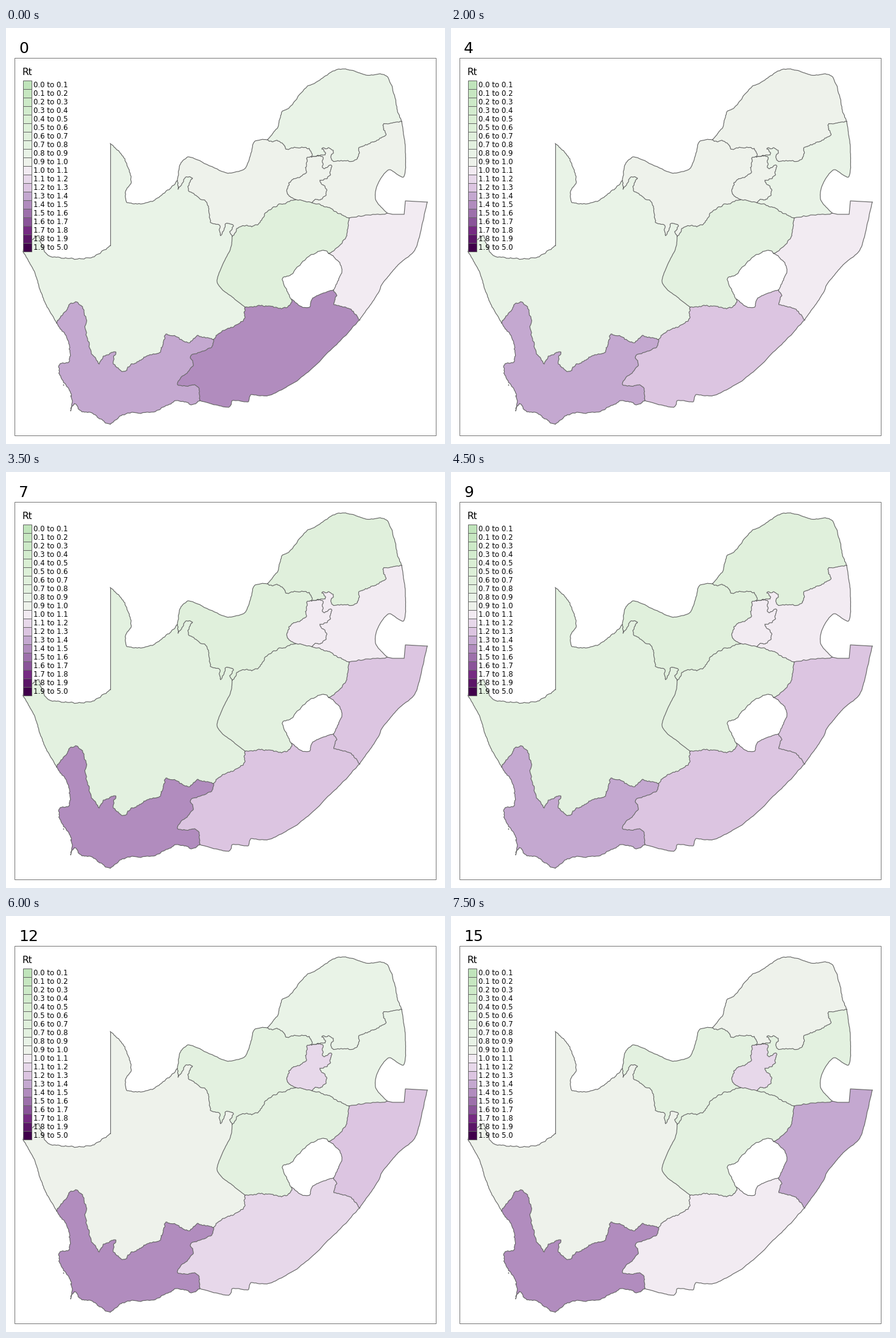
A matplotlib script that plays this animation: 720 px wide and 681 px high, repeating every 8000 ms.

```python
import numpy as np
import matplotlib.pyplot as plt
from matplotlib.animation import FuncAnimation
from matplotlib.colors import LinearSegmentedColormap
from matplotlib.patches import Polygon, Rectangle

W, H, DPI = 720, 681, 100
FRAMES, INTERVAL = 16, 500
CLASSES = 20
INK = "#666666"
rng = np.random.default_rng(7)

KEY_COLOURS = {0: "#c0e4bb", 4: "#daefd4", 7: "#e3f1e0", 8: "#e9f3e7", 9: "#eef2eb",
               10: "#f2ebf2", 12: "#dcc5e1", 13: "#c4a8d0", 16: "#8a5499",
               17: "#762b83", 19: "#40004b"}
palette = LinearSegmentedColormap.from_list(
    "rt", [(k / (CLASSES - 1), c) for k, c in KEY_COLOURS.items()], N=CLASSES)

borders = []


def px(size):
    return size * 72 / DPI


def arc(*keys, rough=0.1):
    """Curve through key points by four-point subdivision with fractal jitter."""
    pts = np.array(keys, float)
    for _ in range(4):
        pad = np.vstack([2 * pts[0] - pts[1], pts, 2 * pts[-1] - pts[-2]])
        step = np.diff(pts, axis=0)
        size = np.hypot(*step.T)[:, None]
        bulge = (pts[:-1] + pts[1:] - pad[:-3] - pad[3:]) / 16
        reach = np.hypot(*bulge.T)[:, None]
        bulge *= np.minimum(1, 0.1 * size / np.maximum(reach, 1e-9))
        normal = np.column_stack([-step[:, 1], step[:, 0]]) / size
        jag = rough * np.minimum(size, 6) * rng.uniform(-1, 1, size.shape)
        out = np.empty((2 * len(pts) - 1, 2))
        out[::2] = pts
        out[1::2] = (pts[:-1] + pts[1:]) / 2 + bulge + jag * normal
        pts = out
    borders.append(pts)
    return pts


def straight(*keys):
    borders.append(np.array(keys, float))
    return borders[-1]


def ring(*arcs):
    """Join arcs end to end, flipping them where needed."""
    first, second = arcs[:2]
    ends = (tuple(second[0]), tuple(second[-1]))
    path = list(first if tuple(first[-1]) in ends else first[::-1])
    for a in arcs[1:]:
        path += list(a if np.allclose(a[0], path[-1]) else a[::-1])
    return np.array(path)


# Junctions where three regions, or two and the outside, meet
nc_wc_sea, nc_wc_ec, nc_ec_fs = (83, 483), (340, 510), (392, 457)
nc_fs_nw, nc_nw_out, nw_lp_out = (371, 341), (281, 250), (429, 183)
nw_gt_lp, lp_mp_out, mp_kz_out = (501, 211), (649, 153), (625, 303)
fs_mp_kz, fs_gt_mp, fs_nw_gt = (563, 311), (502, 286), (475, 281)
fs_kz_hole, fs_ec_hole, ec_kz_hole = (529, 369), (468, 444), (537, 429)
ec_kz_sea, wc_ec_sea, kz_corner = (580, 478), (318, 610), (691, 285)
top_west, corner_west, river_mouth = (171, 189), (171, 356), (28, 366)

# Outer border
river = arc(corner_west, (140, 376), (100, 377), (68, 371), (54, 340), (42, 347),
            river_mouth, rough=0.2)
meridian = straight(corner_west, top_west)
nc_north = arc(nc_nw_out, (265, 265), (240, 284), (199, 286), (196, 268), (205, 250),
               (192, 210), top_west, rough=0.15)
nw_north = arc(nw_lp_out, (406, 188), (394, 227), (361, 237), (300, 211), (286, 223),
               nc_nw_out)
lp_out = arc(lp_mp_out, (642, 135), (626, 80), (590, 77), (560, 68), (535, 71),
             (510, 88), (492, 98), (465, 130), (452, 138), (446, 162), nw_lp_out)
mp_out = arc(mp_kz_out, (606, 280), (611, 253), (629, 232), (652, 244), (655, 200),
             lp_mp_out, rough=0.05)
kz_north = straight(kz_corner, (655, 283), (653, 305), (634, 305), mp_kz_out)
kz_sea = arc(ec_kz_sea, (611, 433), (617, 419), (645, 386), (668, 367), (677, 345),
             kz_corner, rough=0.05)
ec_sea = arc(wc_ec_sea, (365, 621), (371, 610), (397, 612), (402, 600), (433, 601),
             (488, 569), (545, 515), ec_kz_sea, rough=0.08)
wc_sea = arc(nc_wc_sea, (102, 512), (104, 545), (88, 551), (88, 568), (107, 602),
             (106, 627), (112, 615), (124, 628), (146, 633), (171, 649), (191, 633),
             (245, 628), (275, 612), (307, 616), wc_ec_sea, rough=0.2)
nc_sea = arc(river_mouth, (45, 396), (60, 440), nc_wc_sea, rough=0.08)

# Inner borders
nc_wc = arc(nc_wc_sea, (94, 467), (113, 449), (128, 462), (134, 512), (153, 550),
            (160, 537), (179, 530), (176, 545), (192, 562), (208, 550), (238, 535),
            (254, 527), (264, 501), (298, 515), (316, 504), nc_wc_ec, rough=0.25)
wc_ec = arc(nc_wc_ec, (337, 523), (303, 537), (307, 553), (281, 583), (311, 585),
            (317, 600), wc_ec_sea, rough=0.2)
nc_ec = arc(nc_ec_fs, (389, 480), (356, 495), nc_wc_ec, rough=0.25)
nc_fs = arc(nc_fs_nw, (368, 362), (346, 413), (368, 438), nc_ec_fs, rough=0.05)
nc_nw = arc(nc_nw_out, (282, 264), (295, 244), (306, 246), (299, 265), (330, 288),
            (335, 318), (349, 322), (352, 340), (361, 320), (372, 322), (367, 333),
            nc_fs_nw, rough=0.2)
fs_nw = arc(nc_fs_nw, (385, 325), (414, 321), (437, 294), fs_nw_gt, rough=0.25)
nw_gt = arc(fs_nw_gt, (461, 270), (468, 250), (491, 238), (493, 214), nw_gt_lp,
            rough=0.25)
nw_lp = arc(nw_lp_out, (452, 188), (463, 199), (497, 197), nw_gt_lp, rough=0.25)
lp_mp = arc(nw_gt_lp, (523, 208), (518, 198), (529, 196), (537, 204), (534, 216),
            (572, 216), (581, 195), (600, 187), (622, 176), (618, 159), lp_mp_out,
            rough=0.25)
gt_mp = arc(nw_gt_lp, (520, 212), (520, 229), (534, 225), (529, 243), (515, 249),
            (526, 264), (520, 277), fs_gt_mp, rough=0.25)
fs_gt = arc(fs_nw_gt, fs_gt_mp, rough=0.2)
fs_mp = arc(fs_gt_mp, (536, 297), fs_mp_kz, rough=0.2)
mp_kz = arc(fs_mp_kz, mp_kz_out, rough=0.2)
fs_kz = arc(fs_mp_kz, (559, 337), (549, 354), fs_kz_hole, rough=0.15)
fs_hole = arc(fs_kz_hole, (519, 364), (495, 375), (466, 405), (453, 411), fs_ec_hole,
              rough=0.15)
kz_hole = arc(fs_kz_hole, (545, 382), (551, 398), ec_kz_hole, rough=0.15)
ec_hole = arc(fs_ec_hole, (486, 457), (498, 457), (503, 442), ec_kz_hole, rough=0.1)
ec_kz = arc(ec_kz_hole, (542, 439), (538, 453), (565, 460), ec_kz_sea, rough=0.2)
fs_ec = arc(nc_ec_fs, (430, 455), (447, 459), (463, 455), fs_ec_hole, rough=0.25)

REGIONS = {
    "nc": ring(river, meridian, nc_north, nc_nw, nc_fs, nc_ec, nc_wc, nc_sea),
    "wc": ring(wc_sea, nc_wc, wc_ec),
    "ec": ring(ec_sea, wc_ec, nc_ec, fs_ec, ec_hole, ec_kz),
    "fs": ring(fs_nw, fs_gt, fs_mp, fs_kz, fs_hole, fs_ec, nc_fs),
    "kz": ring(kz_sea, kz_north, mp_kz, fs_kz, kz_hole, ec_kz),
    "nw": ring(nw_north, nc_nw, fs_nw, nw_gt, nw_lp),
    "gt": ring(nw_gt, fs_gt, gt_mp),
    "lp": ring(lp_out, nw_lp, lp_mp),
    "mp": ring(mp_out, lp_mp, gt_mp, fs_mp, mp_kz),
}

# Colour class of each region, from the given day on
STEPS = {
    "nc": {0: 8, 5: 7, 10: 8, 12: 9, 13: 10, 14: 9},
    "wc": {0: 13, 5: 14, 6: 13, 7: 14, 8: 13, 10: 14, 11: 13, 12: 14, 14: 13, 15: 14},
    "ec": {0: 14, 2: 13, 3: 12, 12: 11, 13: 10},
    "fs": {0: 6, 1: 7},
    "kz": {0: 10, 1: 11, 2: 10, 5: 11, 7: 12, 10: 11, 12: 12, 14: 13},
    "nw": {0: 9, 5: 8, 7: 6, 10: 7},
    "gt": {0: 9, 7: 10, 11: 11},
    "lp": {0: 8, 1: 9, 5: 8, 7: 6, 10: 7, 12: 8, 14: 9},
    "mp": {0: 9, 2: 8, 5: 9, 7: 10, 10: 9, 12: 8, 14: 7},
}


def level(name, day):
    steps = STEPS[name]
    return steps[max(d for d in steps if d <= day)]


plt.rcParams["font.family"] = "DejaVu Sans"
fig = plt.figure(figsize=(W / DPI, H / DPI), dpi=DPI, facecolor="white")
ax = fig.add_axes([0, 0, 1, 1])
ax.set_xlim(0, W)
ax.set_ylim(H, 0)
ax.axis("off")

ax.add_patch(Rectangle((14, 49), 691, 618, fill=False, ec="#777777", lw=px(1)))

shapes = {name: ax.add_patch(Polygon(outline, lw=0, zorder=2))
          for name, outline in REGIONS.items()}
for line in borders:
    ax.plot(*line.T, color=INK, lw=px(1.15), zorder=3, solid_joinstyle="round")
for islet in [(93.5, 584), (105.5, 601.5)]:
    ax.plot(*islet, "o", color=INK, ms=px(2), mew=0, zorder=3)

ax.text(27, 77, "Rt", fontsize=px(15.3), va="baseline", zorder=5)
for i in range(CLASSES):
    top = 86 + 14 * i
    ax.add_patch(Rectangle((28, top - 0.5), 14, 14, fc=palette(i), ec=INK, lw=px(1),
                           zorder=4))
    upper = 5.0 if i == CLASSES - 1 else (i + 1) / 10
    ax.text(45.4, top + 11, f"{i / 10:.1f} to {upper:.1f}", fontsize=px(11.75),
            va="baseline", zorder=5)

title = ax.text(21.2, 41, "", fontsize=px(25), va="baseline")


def draw(day):
    title.set_text(str(day))
    for name, shape in shapes.items():
        shape.set_facecolor(palette(level(name, day)))
    return [title, *shapes.values()]


anim = FuncAnimation(fig, draw, frames=FRAMES, interval=INTERVAL, repeat=True)
plt.show()
```
